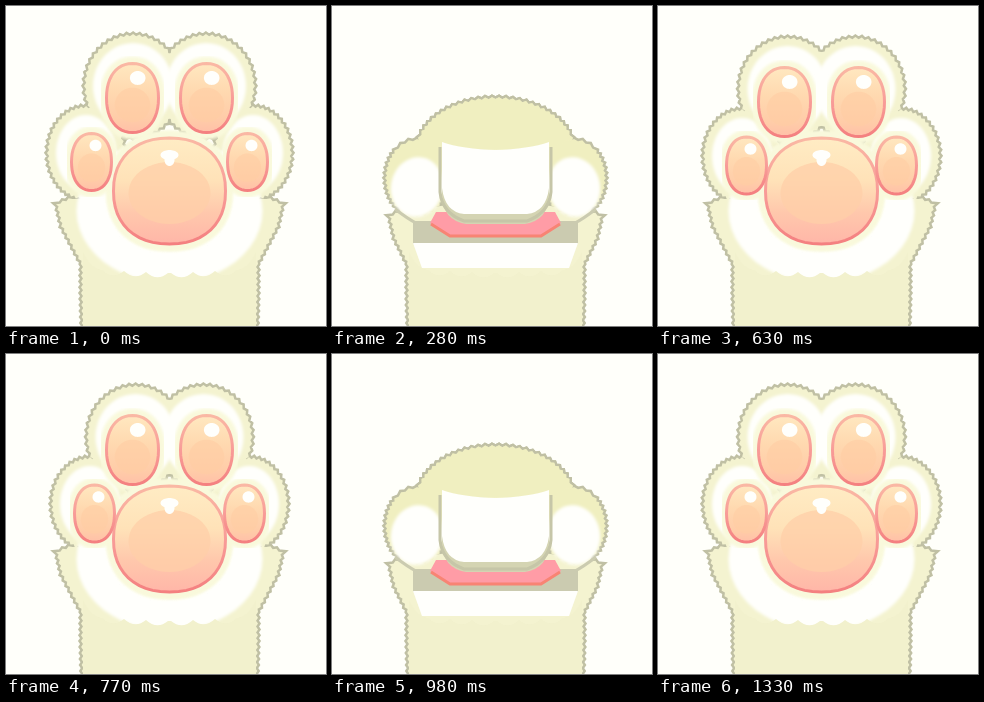
Recreate the animation shown at these times as an HTML page. Size 320 px wide and 320 px high, loop 1400 ms.

```html
<!DOCTYPE html>
<html lang="en">
<head>
<meta charset="utf-8">
<title>Kneading paw</title>
<style>
html, body { margin: 0; width: 100%; height: 100%; overflow: hidden; background: #fffffa; }
svg { display: block; width: 100vw; height: 100vh; }
</style>
</head>
<body>
<svg viewBox="0 0 320 320">
  <defs>
    <linearGradient id="bean" x2="0" y2="1">
      <stop offset="0" stop-color="#ffe8c0"/>
      <stop offset=".4" stop-color="#ffd9b0"/>
      <stop offset=".8" stop-color="#ffcca8"/>
      <stop offset="1" stop-color="#ffc0a8"/>
    </linearGradient>
    <linearGradient id="rim" x2="0" y2="1">
      <stop offset="0" stop-color="#fab8a4"/>
      <stop offset=".5" stop-color="#f89c98"/>
      <stop offset="1" stop-color="#f48080"/>
    </linearGradient>
    <linearGradient id="pad" x2="0" y2="1">
      <stop offset="0" stop-color="#ffecc4"/>
      <stop offset=".4" stop-color="#ffe2b8"/>
      <stop offset=".7" stop-color="#ffc8ac"/>
      <stop offset="1" stop-color="#ffb6a8"/>
    </linearGradient>
    <filter id="soft"><feGaussianBlur stdDeviation="1.8"/></filter>
  </defs>
  <g id="paw"></g>
</svg>
<script>
const MID = 163.5, STEP = 70, BEATS = 10;
const WHITE = '#fffffc', SHADE = '#f4f3d0', OLIVE = '#d4d4b0', EDGE = '#c0c0a4', GLOW = '#f9f9dc';
const paw = document.getElementById('paw');

// Blobs are [x, y, rx, ry, turn, power]; everything describes the left half.
const open = s => ({
  toe: [129.5 - 2.5 * s, 83 - 3 * s, 48, 51, 0, 2],
  side: [84 - 4 * s, 150 - 3 * s, 38, 46, 0, 2],
  bean: [126.5, 96 - 4 * s, 26, 34.5, 0, 2.2],
  outer: [88.5 - 3 * s, 159.5 - 3.5 * s, 20, 28.5, 0, 2.2],
  pad: [MID, 185, 56, 53, 0, 2.25],
  core: [MID, 187, 41, 31, 0, 2],
  wrist: [51, 192]
});
const half = {
  toe: [135, 101, 41, 26, -18, 2],
  side: [80, 155, 23, 40, 18, 2],
  bean: [137, 141, 22.5, 15.5, -20, 2.2],
  outer: [103, 174, 10.5, 22, 24, 2.2],
  pad: [MID, 197.5, 56, 40, 0, 3.2],
  core: [MID, 205, 40, 20, 0, 2.5],
  wrist: [61, 196]
};

const clamp = v => Math.max(0, Math.min(1, v));
const mix = (a, b, k) => Object.fromEntries(Object.keys(a).map(n =>
  [n, a[n].map((v, i) => v + (b[n][i] - v) * k)]));

function ring([x, y, rx, ry, turn = 0, power = 2], n = 48) {
  const r = turn * Math.PI / 180, bend = v => Math.sign(v) * Math.abs(v) ** (2 / power);
  return Array.from({ length: n + 1 }, (_, i) => {
    const t = i / n * 2 * Math.PI, u = rx * bend(Math.cos(t)), v = ry * bend(Math.sin(t));
    return [x + u * Math.cos(r) - v * Math.sin(r), y + u * Math.sin(r) + v * Math.cos(r)];
  });
}

// Walks along the points and pushes every other step outwards.
function fur(pts) {
  const out = [];
  for (let i = 1; i < pts.length; i++) {
    const [x, y] = pts[i - 1], dx = pts[i][0] - x, dy = pts[i][1] - y;
    const len = Math.hypot(dx, dy) || 1, n = Math.max(1, Math.round(len / 3));
    for (let j = 0; j < n; j++) {
      const k = (out.length % 2 ? 1 : -1) / len;
      out.push([x + dx * j / n - dy * k, y + dy * j / n + dx * k]);
    }
  }
  return out;
}

const trace = pts => 'M' + pts.map(q => q.map(v => v.toFixed(1)).join(' ')).join('L');
const path = (d, fill, more = '') => `<path d="${d}" fill="${fill}" ${more}/>`;
const line = (d, color, w = 2.5) => path(d, 'none', `stroke="${color}" stroke-width="${w}"`);
const blob = (b, fill, more) => path(trace(ring(b)) + 'Z', fill, more);
const inset = ([x, y, rx, ry, ...rest], d) => [x, y, rx - d, ry - d, ...rest];
const both = s => s + `<g transform="matrix(-1 0 0 1 ${2 * MID} 0)">${s}</g>`;
const fade = (o, s) => o > 0 ? `<g opacity="${o}">${s}</g>` : '';
const soft = 'filter="url(#soft)"';

function wrist([x, y]) {
  return trace(fur([[x + 15, y], [x, y + 6], [x + 5, y + 28], [76, 258], [76, 290], [77, 326]])) + 'L165 326V192Z';
}

const sleeve = both(path('M77 246Q84 262 96 264' + 'q11 10 22 1'.repeat(3) + 'H165V322H77Z', '#f2f1cd'));

// Outlines go first, so the fills join the lobes into one silhouette.
function silhouette(p) {
  const lobes = [p.toe, p.side].map(b => trace(fur(ring(b))) + 'Z');
  return {
    lines: both([...lobes, wrist(p.wrist)].map(d => line(d, EDGE, 5)).join('')),
    base: both(path(wrist(p.wrist), SHADE)),
    lobes: fill => both(lobes.map(d => path(d, fill)).join(''))
  };
}

function bean(b) {
  const [x, y, rx, ry, turn] = b;
  return blob(b, 'url(#bean)', 'stroke="url(#rim)" stroke-width="3"') +
    blob([x, y + ry * .2, rx * .68, ry * .5, turn], '#ffcda4', 'opacity=".6"');
}

function shine(p) {
  return [-1, 1].map(s => {
    const at = ([x, y, rx, ry]) => [MID + s * (MID - x) + rx * .2, y - ry * .58, rx * .3, ry * .2];
    return blob(at(p.bean), WHITE) + blob(at(p.outer), WHITE);
  }).join('') + blob([MID, 149, 9, 5], WHITE) + blob([MID, 154, 5, 6], WHITE);
}

function palm(p, c) {
  const s = silhouette(p), d = 8 - 3 * c;
  const halo = [p.bean, p.outer, p.pad].map(b =>
    blob(b, 'none', `stroke="${GLOW}" stroke-width="14" ${soft}`)).join('');
  const folds = both(
    blob([MID, 186, 80, 63, 0, 3.5], OLIVE) +
    path('M66 190L76 198L92 200V190Z', OLIVE) +
    blob([77, 217, 11, 20, -8], WHITE, soft));
  const crease = line(`M${MID} 76V122`, '#cacaaa', 3);
  const cuff = both(path('M78 238Q110 247 165 241V262H82Z', SHADE) +
    path('M92 258Q120 252 165 256V267H98Z', WHITE, soft));
  return s.lines + s.base + fade(c, folds) + s.lobes(SHADE) +
    both(blob(inset(p.toe, d), WHITE, soft) + blob(inset(p.side, d), WHITE, soft)) +
    fade(1 - c, blob([MID, 205, 93, 72], WHITE, soft) + both(halo)) +
    sleeve + fade(c, cuff + crease) +
    blob(p.pad, 'url(#pad)', 'stroke="url(#rim)" stroke-width="3"') +
    blob(p.core, '#ffcfa8', 'opacity=".75"') +
    both(bean(p.bean) + bean(p.outer)) + fade(1 - c, shine(p));
}

function fist(drop) {
  const s = silhouette({
    toe: [MID, 146 + drop, 79, 54],
    side: [85, 172 + drop, 31, 38],
    wrist: [58, 204]
  });
  const under = both(
    path('M81 215H165V238H81Z', '#cbcbb0') +
    path('M81 237H165V262H90Z', WHITE) +
    path('M104 206L98 217L118 230H165V206Z', '#ff9ca6') +
    line('M99 218L118 230H165', '#f88474', 3));
  const toes = both(
    blob([85, 181, 26, 30, 12], WHITE, soft) +
    path('M110 140Q130 144 165 144V218H134Q110 214 110 188Z', '#d4d4b2') +
    path('M110 136Q130 143 165 144V208H132Q113 206 110 182Z', WHITE) +
    line('M108 141V186Q110 207 132 215H165', '#c6c6a8', 3) +
    line('M63 203Q76 213 84 217', '#cbcbb0', 3));
  return s.lines + s.base + s.lobes('#f0efc0') + sleeve + under +
    `<g transform="translate(0 ${drop})">${toes}</g>`;
}

// Closes over three beats, squeezes, then springs open and wobbles.
function pose(k) {
  const curl = Math.max(0, Math.min((k - 1) / 2, 8 - k));
  if (curl > 1) return fist(3 * clamp(1 - Math.abs(k - 5)));
  const spread = k % 2 ? 0 : 1;
  return palm(mix(open(curl ? 0 : spread), half, curl), curl);
}

const poses = Array.from({ length: BEATS }, (_, k) => pose(k));
let shown = -1;

function draw(ms) {
  const k = Math.floor(ms / STEP) % BEATS;
  if (k !== shown) paw.innerHTML = poses[shown = k];
}

const start = performance.now();
function tick() {
  draw(performance.now() - start);
  requestAnimationFrame(tick);
}
tick();
</script>
</body>
</html>
```
